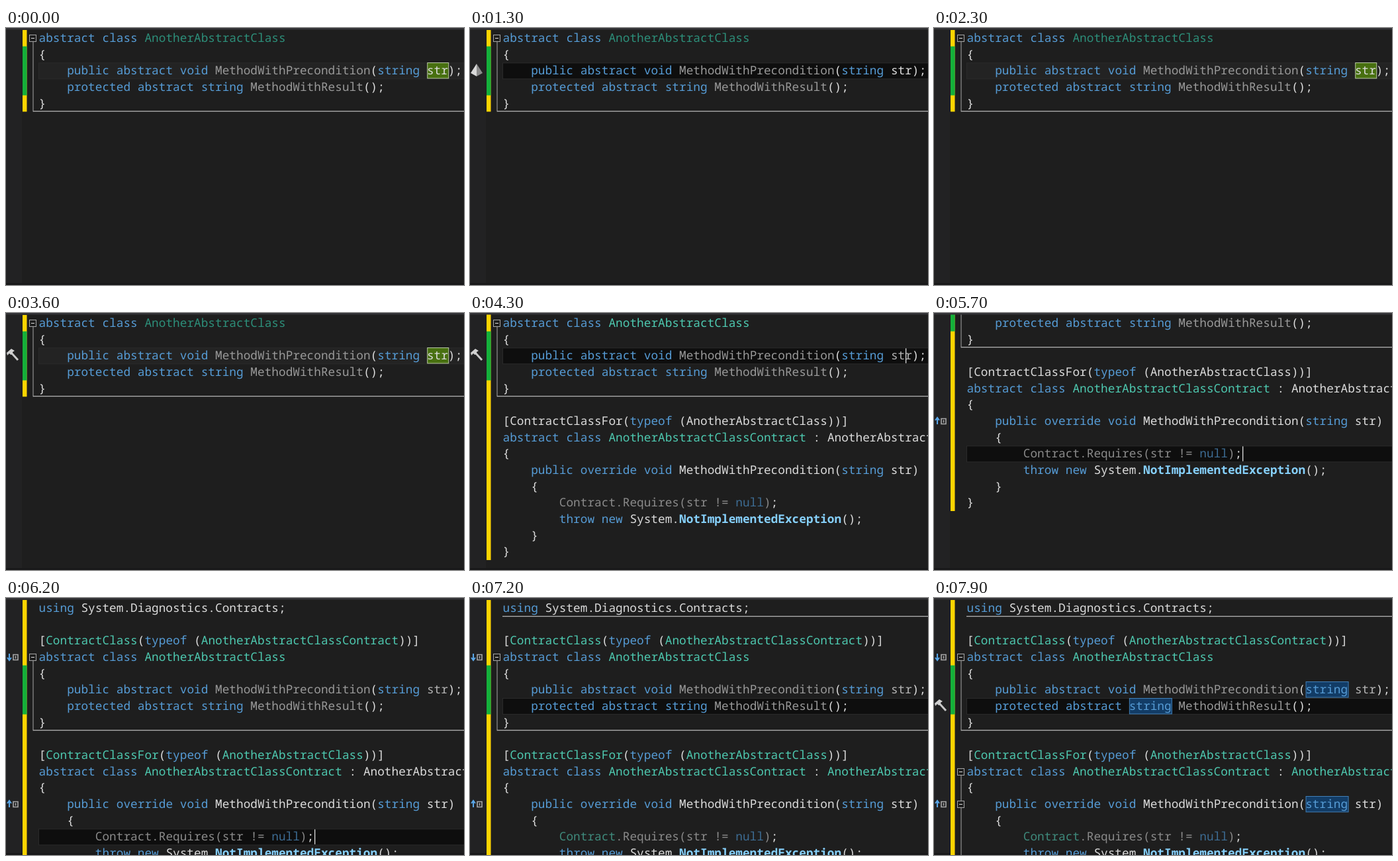
Write an HTML page that moves like this. It is 692 px wide and 388 px high and loops after 8000 ms.

```html
<!DOCTYPE html>
<html>
<head>
<meta charset="utf-8">
<style>
html, body { margin: 0; width: 100%; height: 100%; overflow: hidden; background: #1e1e1e; }
svg { display: block; }
text {
  font: 17.78px "Noto Sans Mono", "DejaVu Sans Mono", monospace;
  text-rendering: geometricPrecision; white-space: pre; fill: #dcdcdc;
}
.k { fill: #569cd6; }
.t, .typed .u, .bound .v { fill: #4ec9b0; }
.plain .t { fill: #2d8f7a; }
.g { fill: #999; }
.d, .c { fill: #8a8a8a; }
.bound .c { fill: #3f8a7c; }
.n { fill: #3d6c93; }
.e { fill: #86d0fb; font-weight: bold; }
.s { fill: #b4b4b4; }
.plain .s { fill: #dcdcdc; }
</style>
</head>
<body>
<svg id="stage" width="692" height="388"></svg>
<script>
const LINE = 24.667, TOP = 3, LEFT = 49.5, COL = 10.668, FIRST = -3;

// x{...} marks a run of class x; keywords are marked automatically
const source = `using System.Diagnostics.Contracts;

[u{ContractClass}(typeof (u{AnotherAbstractClassContract}))]
abstract class t{AnotherAbstractClass}
{
    public abstract void g{MethodWithPrecondition}(string s{str});
    protected abstract string g{MethodWithResult}();
}

[u{ContractClassFor}(typeof (u{AnotherAbstractClass}))]
abstract class t{AnotherAbstractClassContract} : v{AnotherAbstractClass}
{
    public override void MethodWithPrecondition(string str)
    {
        c{Contract}d{.Requires(str != }n{null}d{)};
        throw new System.e{NotImplementedException}();
    }
}`.split("\n");

const keywords = /\b(using|typeof|abstract|class|public|protected|override|void|string|throw|new)\b/g;
const lineY = n => TOP + n * LINE;
const colX = c => LEFT + c * COL;
const rect = (x, y, w, h, fill, extra = "") =>
  `<rect x="${x}" y="${y}" width="${w}" height="${h}" fill="${fill}" ${extra}/>`;
const path = (d, style) => `<path d="${d}" ${style}/>`;
const at = (n, art) => `<g transform="translate(0 ${Math.round(lineY(n))})">${art}</g>`;

const code = source.map((s, i) => {
  const marked = s.replace(keywords, "k{$1}")
    .replace(/(\w)\{(.*?)\}/g, '<tspan class="$1">$2</tspan>');
  return `<text x="${LEFT}" y="${Math.round(lineY(i + FIRST) + 18)}">${marked}</text>`;
});

const pyramid = path("M10 2L1 16L10 21Z", 'fill="#d8d8d8"') + path("M10 2L19 16L10 21Z", 'fill="#8c8c8c"');
const hammer = path("M8 8L18 19", 'stroke="#c8c8c8" stroke-width="3"') +
  path("M1 8L8 2L13 5L10 7L10 10L7 11L5 9L2 12Z", 'fill="#d0d0d0"');
const arrow = up => path(up ? "M5 17V8M2 11L5 7L8 11" : "M5 7V16M2 13L5 17L8 13",
  'fill="none" stroke="#5aa7e8" stroke-width="2"') +
  path("M11 8.5H18V16.5H11ZM14.5 10.5V14.5", 'fill="none" stroke="#a8a8a8" stroke-width="1.6"');

function bar(from, to, color) {
  return rect(25, lineY(from), 6.5, (to - from) * LINE, color);
}
function rule(n, x) {
  return rect(x, Math.round(lineY(n)) - 1, 692 - x, 1.3, "#b0b0b0");
}
function fold(n) {
  return at(n, rect(35.5, 7.5, 10, 10, "#1e1e1e", 'stroke="#a5a5a5"') + rect(38, 12, 5, 1, "#ddd"));
}
function bracket(from, to) {
  return rect(40.5, lineY(from) + 18, 1, (to - from) * LINE - 18, "#a5a5a5") + rule(to, 41);
}
function mark(n, col, len, fill, stroke) {
  return rect(colX(col) + .5, Math.round(lineY(n)) + .5, len * COL, 23.5, fill, `stroke="${stroke}"`);
}
function caret(n, col) {
  return rect(Math.round(colX(col)), lineY(n) + 1, 1.3, 22.5, "#dcdcdc");
}

function draw(t) {
  const added = t >= 4100;
  const idle = t < 500 || t >= 2000 && t < 4100;
  const scroll = t < 5100 ? 0 : t < 6000 ? 3 : t < 6100 ? 0 : -3;
  const current = t < 5700 ? 2 : t < 7000 ? 11 : 3;
  const classes = [!added && "plain", t >= 6000 && "typed", t >= 6500 && "bound"].filter(Boolean).join(" ");

  let out = rect(LEFT, lineY(current) + .5, 650, 24, idle ? "#232323" : "#0e0e0e", 'stroke="#2a2a2a"');
  out += added ? bar(-3, 15, "#ffd500") : bar(0, 5, "#ffd500");
  out += bar(1, 4, "#15b03a") + bracket(0, 5) + fold(0);

  if (t >= 7000) out += rule(-2, 49);
  if (t >= 7800) out += bracket(7, 15) + fold(7) + fold(9);
  if (idle) out += mark(2, 55, 3, "#487010", "#b9c8a4");
  if (t >= 7500)
    for (const [n, col] of [[2, 48], [3, 23], [9, 48]]) out += mark(n, col, 6, "#123c66", "#4280b8");

  out += added ? code.join("") : code.slice(3, 8).join("");

  if (t >= 1000 && t < 2000) out += at(2, pyramid);
  if (t >= 3200 && t < 5100) out += at(2, hammer);
  if (t >= 7600) out += at(3, hammer);
  if (t >= 4700) out += at(0, arrow(false)) + at(9, arrow(true));
  if (added && t < 5100) out += caret(2, 57);
  if (t >= 5700 && t < 7000) out += caret(11, 39);

  return rect(0, 0, 24, 388, "#222223") + rect(0, 385, 692, 3, "#19191a") +
    `<g class="${classes}" transform="translate(0 ${Math.round(-scroll * LINE)})">${out}</g>` +
    rect(0, 0, 692, 2.5, "#333337");
}

const stage = document.getElementById("stage");
let shown = "";
function tick() {
  const next = draw(performance.now() % 8000);
  if (next !== shown) stage.innerHTML = shown = next;
  requestAnimationFrame(tick);
}
tick();
</script>
</body>
</html>
```
